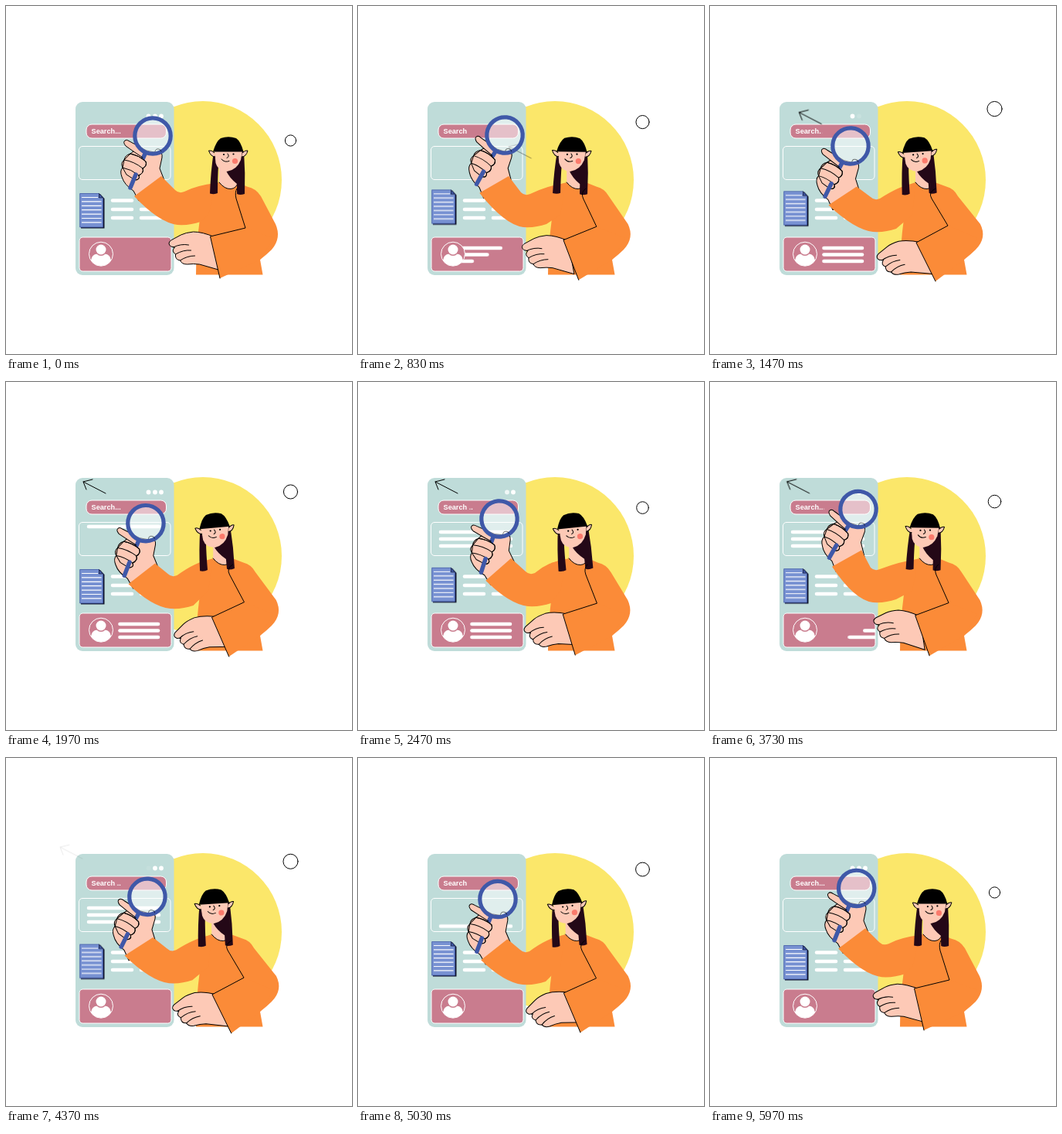
Animation, 448 px wide and 450 px high, one loop 6010 ms. Source, as an HTML page:

```html
<!DOCTYPE html>
<html lang="en">
<head>
<meta charset="utf-8">
<title>Search illustration</title>
<style>
  html, body { margin: 0; width: 100%; height: 100%; overflow: hidden; background: #fff; }
  svg { display: block; width: 100vw; height: 100vh; }
  :root { --sine: cubic-bezier(.37, 0, .63, 1); }

  .label { font: bold 9.2px "Liberation Sans", Arial, sans-serif; fill: #fff; }
  .rule { stroke: #fff; stroke-width: 4.6; stroke-linecap: round; fill: none; }
  .ink { fill: none; stroke: #000; stroke-width: 1; stroke-linecap: round; stroke-linejoin: round; }
  .skin { fill: #fdc9b6; }
  .edge { stroke: #000; stroke-width: 1; stroke-linejoin: round; }
  .orange { fill: #fb8b38; }
  .pink { fill: #c97c8e; }
  .hair { fill: #240817; }
  .handle { stroke: #3f58a8; stroke-width: 5.5; stroke-linecap: round; }

  .dot { animation: blink 2003.333ms linear infinite; }
  .dot.b { animation-delay: -1793.333ms; }
  .dot.c { animation-delay: -1583.333ms; }
  @keyframes blink {
    0%, 11% { fill-opacity: 1; }
    19%, 61.5% { fill-opacity: 0; }
    71.5%, 100% { fill-opacity: 1; }
  }

  .ring { animation: ring 1502.5ms var(--sine) infinite alternate; }
  @keyframes ring { from { cy: 174px; r: 7.1px; } to { cy: 133px; r: 9.6px; } }

  .doc { animation: bob 1001.667ms var(--sine) infinite alternate; }
  @keyframes bob { to { transform: translateY(-5px); } }

  .card-row { animation: pass-x 6010ms var(--sine) infinite; }
  .card-row.b { animation-delay: -5910ms; }
  .card-row.c { animation-delay: -5810ms; }
  @keyframes pass-x {
    0%, 6.5% { transform: translateX(-75px); }
    16.5%, 54.1% { transform: none; }
    64.1%, 100% { transform: translateX(75px); }
  }

  .box-rows { animation: pass-y 6010ms var(--sine) infinite; }
  @keyframes pass-y {
    0%, 27.5% { transform: translateY(-44px); }
    39.1%, 77.2% { transform: none; }
    89.7%, 100% { transform: translateY(44px); }
  }

  .arrow { animation: arrow 6010ms infinite; }
  @keyframes arrow {
    0%, 13.3% { transform: translate(101px, 56px); opacity: 0; animation-timing-function: cubic-bezier(.5, 1, .89, 1); }
    15.5% { opacity: 1; }
    31.6% { transform: none; }
    60.7% { transform: none; animation-timing-function: cubic-bezier(.11, 0, .5, 0); }
    71% { opacity: 1; }
    73.7%, 100% { transform: translate(-35px, -16px); opacity: 0; }
  }
</style>
</head>
<body>
<svg viewBox="0 0 448 450">
  <defs>
    <clipPath id="boxClip"><rect x="95" y="182" width="118" height="42" rx="4"/></clipPath>
    <clipPath id="cardClip"><rect x="124" y="300" width="89.5" height="42"/></clipPath>
  </defs>

  <circle cx="255" cy="225" r="102" fill="#fbe76a"/>
  <rect x="90" y="124" width="127.5" height="224" rx="9" fill="#bfdcd9"/>

  <g fill="#fff">
    <circle class="dot" cx="184.5" cy="142.5" r="2.9"/>
    <circle class="dot b" cx="193" cy="142.5" r="2.9"/>
    <circle class="dot c" cx="201" cy="142.5" r="2.9"/>
  </g>

  <rect class="pink" x="104" y="153" width="103.5" height="18" rx="7" stroke="#fff"/>
  <text class="label" x="110.5" y="165.3">Search<tspan class="dot">.</tspan><tspan class="dot b">.</tspan><tspan class="dot c">.</tspan></text>

  <rect x="94.5" y="181.5" width="118.5" height="43" rx="4.5" fill="none" stroke="#fff"/>
  <g clip-path="url(#boxClip)">
    <path class="rule box-rows" d="M107 194H198M107 203H198M107 212H198"/>
  </g>

  <path class="rule" d="M138 251.500H163M138 263H163M138 274H163M175 251.500H201M175 263H201M175 274H201"/>

  <g class="doc">
    <path d="M97 243H122L127.500 249V287.500H97Z" fill="#10142c"/>
    <path d="M95.700 242.500H120.500L125.500 248V286H95.700Z" fill="#7791d2" stroke="#3f58a8" stroke-width=".8"/>
    <path d="M120.500 242.500V248H125.500Z" fill="#3f58a8" stroke="#10142c" stroke-width=".7"/>
    <path id="docLines" stroke="#fff" stroke-width="1.2"/>
  </g>

  <rect class="pink" x="95" y="299" width="119" height="44" rx="4.500" stroke="#fff"/>
  <g clip-path="url(#cardClip)">
    <path class="rule card-row" d="M147.500 313H197"/>
    <path class="rule card-row b" d="M147.500 321.500H197"/>
    <path class="rule card-row c" d="M147.500 330H197"/>
  </g>
  <circle class="pink" cx="123" cy="320.700" r="15.500" stroke="#fff"/>
  <path d="M110 329Q111 321 118 320.500H128Q135 321 136 329Q131 336 123 336Q115 336 110 329Z" fill="#fff"/>
  <circle class="pink" cx="123" cy="315.500" r="7.600"/>
  <circle cx="123" cy="315" r="6.500" fill="#fff"/>

  <circle class="ring ink" cx="368.500" cy="174" r="7.100"/>

  <path id="body" class="orange"/>

  <g class="arrow">
    <path class="ink" d="M129 144L100 129L112 126M100 129L104 139"/>
  </g>

  <!-- Hand holding the lens; origin is the lens centre -->
  <g id="lens">
    <path class="skin edge" d="M-18 84L-25 71Q-37 63-40 53Q-43 45-39 41Q-42 35-37 31Q-36 25-29 23L-25 20L-35 13Q-39 8-36 6Q-34 4-30 7L-8 19L7 22Q13 20 12 28L9 42L16 60Z"/>
    <path class="handle" d="M-9.500 22L-14 32"/>
    <path class="skin edge" d="M-29 23Q-18 25-9 33Q-7 39-13 42Q-11 48-18 51Q-16 57-23 57L-34 50L-39 41L-37 31Z" stroke="none"/>
    <path class="ink" d="M-25 20L-13 28M-29 23Q-18 25-9 33Q-7 39-13 42M-37 31Q-24 33-13 42Q-11 48-18 51M-39 41Q-28 43-18 51Q-16 57-23 57"/>
    <path class="handle" d="M-22 50L-29 67"/>
    <circle r="23.200" fill="#fff" fill-opacity=".52" stroke="#3f58a8" stroke-width="5.200"/>
    <path class="ink" d="M3 20Q4 16 8 17Q11 18 11 20" stroke-opacity=".5"/>
  </g>
  <path id="sleeve" class="orange"/>

  <!-- Resting hand; origin is the upper cuff corner -->
  <g id="rest">
    <path class="skin edge" d="M6 1Q-10-6-22-6Q-32-5-38-2L-51 5Q-56 9-51 13L-46 14Q-51 19-45 23Q-46 30-39 31Q-37 36-30 36Q-22 35-14 36L14 44Z"/>
    <path class="ink" d="M-48 14Q-38 9-28 11M-45 23Q-35 17-25 18M-39 31Q-30 25-20 25"/>
  </g>
  <path id="forearm" class="orange"/>

  <g id="neck">
    <path class="skin" d="M276 229V208H300V229Z"/>
    <path class="skin" d="M276 228Q283 237 291 236.500Q298 236 300 229"/>
    <path class="ink" d="M276 228Q283 237 291 236.500Q298 236 300 229"/>
  </g>

  <g id="head">
    <path class="hair" d="M-19-2L-17 5L-13 16Q-14 32-14 52Q-18 54-24 52.500Q-23 24-19-2Z"/>
    <path class="hair" d="M14-4L20-2Q22 26 21 53Q15 55 11 53V40Q1 32-3 23Z"/>
    <path class="skin" d="M-18-3L-16.500 13Q-14 23-2 24Q11 22 16 9L18-3Z"/>
    <path class="skin edge" d="M-18 0Q-22-4-25.500-3Q-23 5-17 5" fill="#fbb9bb"/>
    <path class="skin edge" d="M18 0Q22-4 25-3Q23 5 17 5" fill="#fbb9bb"/>
    <path d="M-20-1.500Q-16-15-10-19Q0-22.500 10-19Q16-15 19.500-1.500Z"/>
    <circle cx="-6" cy="2" r="1.100"/>
    <circle cx="6.500" cy="1.500" r="1.100"/>
    <path class="ink" d="M-1 1Q2 5-2 6.500M-9 8Q-5 13 1 10.500" stroke-width=".8"/>
    <circle cx="8.500" cy="10.500" r="3.600" fill="#fb7a6c"/>
  </g>

  <path id="seam" class="ink"/>
</svg>

<script>
  const $ = id => document.getElementById(id);
  const P = 3005;
  const KEYS = [0, 725, 830, 1470, 2025, 2470];
  const N = KEYS.length;

  const pose = {
    lensX: [190, 192, 190, 182, 181, 183],
    lensY: [168, 164.5, 167, 181, 182.5, 177],
    lensTurn: [0, 7.5, 6.5, 3.4, -1.6, -4.6],
    elbowX: [224, 213, 216, 213, 215, 222],
    elbowY: [243, 245, 246, 252, 253, 250],
    headX: [288, 278.5, 277, 269, 271, 278],
    headTurn: [0, 1, 1, -4, -5, -6],
    restTurn: [0, 2, 0, -11, -17, -13]
  };

  // Smooth periodic curve through the pose values
  function wave(v, t) {
    const p = t % P;
    const i = KEYS.findLastIndex(k => k <= p);
    const at = j => KEYS[(j + N) % N] + P * Math.floor(j / N);
    const val = j => v[(j + N) % N];
    const slope = j => (val(j + 1) - val(j - 1)) / (at(j + 1) - at(j - 1));
    const h = at(i + 1) - at(i), u = (p - at(i)) / h, w = 1 - u;
    return w * w * ((1 + 2 * u) * val(i) + u * h * slope(i))
         + u * u * ((3 - 2 * u) * val(i + 1) - w * h * slope(i + 1));
  }

  function place(id, x, y, turn) {
    $(id).setAttribute("transform", `translate(${x} ${y}) rotate(${turn})`);
  }

  const shape = (id, d) => $(id).setAttribute("d", d);

  shape("docLines", Array.from({ length: 7 }, (_, i) => `M98 ${247.5 + i * 5.4}H${i ? 123.5 : 119}`).join(""));

  function draw(t) {
    const s = {};
    for (const name in pose) s[name] = wave(pose[name], t);
    const k = (1 - Math.cos(2 * Math.PI * t / P)) / 2;
    const mix = (a, b) => a + (b - a) * k;

    place("head", s.headX, 190, s.headTurn);
    place("neck", -10 * k, 0, 0);
    place("lens", s.lensX, s.lensY, s.lensTurn);
    place("rest", mix(264.5, 267), mix(298, 306), s.restTurn);

    shape("body",
      `M250 234L${mix(276, 266)} 228H${mix(300, 291)}L${mix(312, 306)} 233.500` +
      `Q${mix(324, 316)} 236 ${mix(330, 321)} 246L${mix(349, 350)} 282` +
      `Q${mix(357, 359)} 300 344 315Q338 321 329 328L332.500 347.500H246Q246 312 251 275Z`);

    const a = s.lensTurn * Math.PI / 180, c = Math.cos(a), n = Math.sin(a);
    const onHand = (x, y) => `${s.lensX + x * c - y * n} ${s.lensY + x * n + y * c}`;
    const e = (x, y) => `${s.elbowX + x} ${s.elbowY + y}`;
    shape("sleeve",
      `M${onHand(11, 52)}L${e(-5, -5)}Q${e(0, 0)} ${e(7, -3)}Q246 232 ${mix(272, 266)} 229L262 270` +
      `L${e(28, 36)}Q${e(14, 41)} ${e(-2, 40)}Q${e(-26, 37)} ${onHand(-24, 78)}Z`);

    const cuff = `${mix(264.5, 267)} ${mix(298, 306)}`;
    const end = `${mix(277, 292)} ${mix(352, 356)}`;
    const fold = `${mix(310, 308)} ${mix(287, 284)}`;
    shape("forearm", `M${cuff}L${fold}L346 300L329 328L${end}Z`);
    shape("seam",
      `M${mix(299, 292)} 236Q${mix(296, 282)} 241 ${mix(298, 287)} 249L${fold}L${cuff}L${end}`);
  }

  let start;
  function tick(now) {
    start ??= now;
    draw(Math.max(0, now - start) % 6010);
    requestAnimationFrame(tick);
  }
  draw(0);
  requestAnimationFrame(tick);
</script>
</body>
</html>
```
